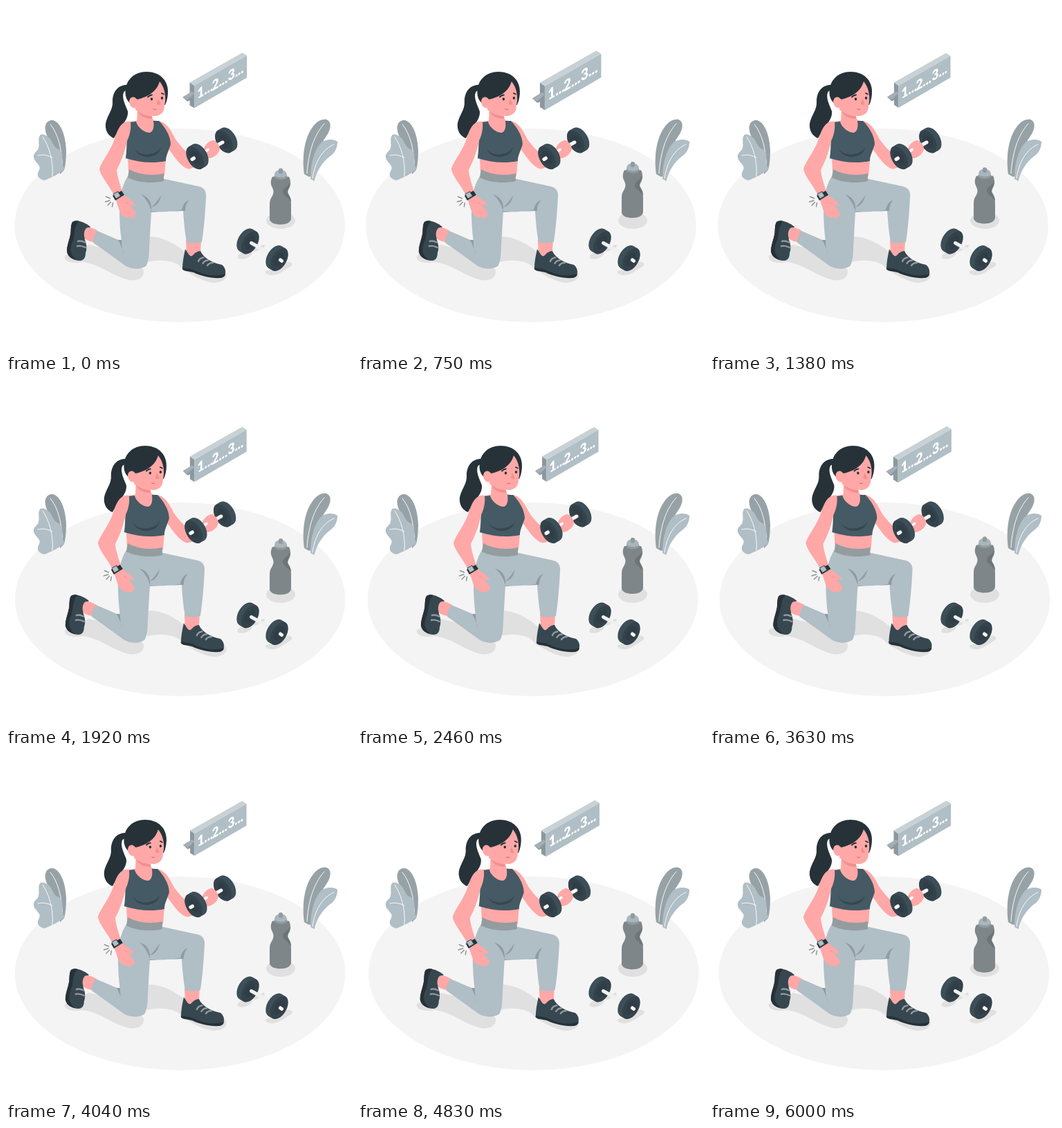
Animation of 500x500 px, one loop 6040 ms. Source, as an HTML page with a canvas:

```html
<!DOCTYPE html>
<html lang="en">
<head>
<meta charset="utf-8">
<title>Counting reps</title>
<style>
html, body { margin: 0; width: 100%; height: 100%; overflow: hidden; background: #fff; }
canvas { display: block; width: 500px; height: 500px; }
</style>
</head>
<body>
<canvas id="stage"></canvas>
<script>
const canvas = document.getElementById('stage');
const ctx = canvas.getContext('2d');
const ratio = Math.max(1, window.devicePixelRatio || 1);
canvas.width = canvas.height = 500 * ratio;

const SKIN = '#ffa8a7', BLUSH = '#f28f8f', HAIR = '#263238', SLATE = '#37474f';
const TOP = '#455a64', CLOTH = '#b0bec5', FOLD = '#8f9ba1', SHADE = '#e0e0e0', WHITE = '#fafafa';

const LOOP = 6040, FRAMES = 145, STEP = 1000 / 24, LEAD = 20;

function fill(d, color) {
  ctx.fillStyle = color;
  ctx.fill(new Path2D(d));
}

function line(d, color, width) {
  ctx.strokeStyle = color;
  ctx.lineWidth = width;
  ctx.lineCap = ctx.lineJoin = 'round';
  ctx.stroke(new Path2D(d));
}

function oval(x, y, rx, ry, color, turn = 0) {
  ctx.fillStyle = color;
  ctx.beginPath();
  ctx.ellipse(x, y, rx, ry, turn, 0, Math.PI * 2);
  ctx.fill();
}

function group(dx, dy, draw) {
  ctx.save();
  ctx.translate(dx, dy);
  draw();
  ctx.restore();
}

// Piecewise linear track through [position, value] stops
function track(p, stops) {
  for (let i = 1; i < stops.length; i++) {
    const [a, va] = stops[i - 1], [b, vb] = stops[i];
    if (p <= b) return va + (vb - va) * (p - a) / (b - a);
  }
  return stops[stops.length - 1][1];
}

const SHAKE = [0, -1, 2, -4, 4, -4, 4, -4, 2, -1, 0].map((v, i) => [i / 10, v]);
const BEAT = [[0, 1], [.1, 1.1], [.3, 1], [.4, 1], [.5, 1.1], [.6, 1], [1, 1]];
const FLOAT = [[0, 0], [.5, -10], [1, 0]];
const phase = (t, period) => (t % period) / period;

// Disc of a weight; side is -1 when its face looks left, 1 when right
function weight(x, y, side) {
  const turn = side * Math.PI / 6;
  const bx = x - side * 3.2, by = y - 1.85, fx = x + side * 3.2, fy = y + 1.85;
  for (let i = 0; i <= 8; i++) {
    oval(bx + (fx - bx) * i / 8, by + (fy - by) * i / 8, 10.6, 18.3, '#3d4f58', turn);
  }
  oval(fx, fy, 10.3, 18, '#34434b', turn);
  oval(fx, fy, 6.2, 10.6, '#2f3e46', turn);
}

function plants() {
  fill('M57 180C55 170 61 164 68 165C78 168 86 184 87 208C87 220 86 230 84 237L78 243C78 226 74 208 66 197C60 190 58 186 57 180Z', '#97a2a7');
  line('M64 171C75 184 81 206 81.500 234', WHITE, 1);
  fill('M50 186C54 184 60 188 64 192C67 196 68 203 74 206C82 210 82 216 81 222C80 228 84 232 84 236C78 242 64 249 55 252C48 250 45 246 46 242C47 238 50 235 48 231C45 226 39 222 40 216C41 211 46 210 47 205C49 199 45 190 50 186Z', CLOTH);
  line('M53 189C62 202 69 224 67 247M46 216C54 214 61 216 67 219', WHITE, 1);
  fill('M431 243C428 222 430 195 441 178C448 167 456 163 463 164C471 167 470 178 463 188C452 203 447 222 446 243L438 247Z', '#97a2a7');
  line('M460 170C446 185 437 210 435 242', WHITE, 1);
  fill('M440 250C440 228 446 206 456 197C463 192 474 192 479 196C479 206 474 214 467 218C457 226 449 238 445.500 253Z', CLOTH);
  line('M474 200C457 207 446 226 443 249', WHITE, 1);
}

function shadows() {
  fill('M85 361C83 369 95 373 110 370C135 372 152 390 178 396C192 398 200 392 199 382L180 360L120 345Z', SHADE);
  fill('M170 340L210 333C235 336 250 348 262 358C270 365 300 375 316 383C322 390 318 399 300 400C285 398 270 390 255 380C248 368 225 365 205 370Z', SHADE);
  oval(397, 310, 21, 12, SHADE);
  oval(345, 360, 11, 5, SHADE, -.3);
  fill('M374 384C378 391 388 390 396 386L412 376C416 372 412 369 406 370Z', SHADE);
  line('M360 353L372 347', SHADE, 4);
}

function floorWeights() {
  weight(349.5, 340, 1);
  line('M354.500 342.500L384 359', '#f0f0f0', 5);
  weight(391.5, 364.5, 1);
  line('M396.500 367L398.500 368.300', WHITE, 5);
}

function bottle() {
  fill('M385 247C382 252 382 258 385 263C388 269 386 273 383 278C381 281 381 285 381 290V309C383 314 389 316 397 316C405 316 411 313 412 308V287C412 281 411 277 408 273C406 269 408 266 410 262C412 257 411 251 409 247Z', '#7f868a');
  fill('M411 255C411 260 407 264 407 269C408 273 412 276 412 283C408 277 401 275 400 269C400 263 406 262 411 255Z', '#6d757a');
  oval(397, 246.5, 9.5, 5, FOLD);
  fill('M388 245C388 239 392 237 397 237C402 237 406 240 406 245C404 249 390 249 388 245Z', '#a9b6bc');
  fill('M394 237C394 234 400 234 400 237V241C399 243 395 243 394 241Z', FOLD);
}

function sign(scale) {
  ctx.save();
  ctx.translate(302, 107.5);
  ctx.scale(scale, scale);
  ctx.translate(-302, -107.5);
  fill('M266 110.500L272.500 115V147L266 143Z', '#8d989e');
  fill('M266 110.500L341 68L347.500 72L272.500 115Z', '#c8d1d5');
  fill('M272.500 115L347.500 72V103.500L272.500 147Z', CLOTH);
  fill('M256 131.500L270 123V134.500L262.500 137.500Z', '#8d989e');
  fill('M256 131.500L269 123.500L272.500 126L262.500 135.500Z', '#a3afb5');
  ctx.fillStyle = '#fff';
  ctx.font = '900 20px Lato, "Open Sans", sans-serif';
  for (const [text, x, y] of [['1...', 276.5, 134.5], ['2...', 297.5, 123], ['3...', 320.5, 109]]) {
    ctx.save();
    ctx.transform(.866, -.5, 0, 1, x, y);
    ctx.fillText(text, 0, 0);
    ctx.restore();
  }
  ctx.restore();
}

function farArm() {
  fill('M219 166C234 167 240 184 246 194C252 202 258 209 264 213L288 205L296 216C290 223 276 234 264 235.500C252 233 242 215 233 204Z', SKIN);
  weight(318.3, 194, -1);
  line('M286 212L313 197', WHITE, 5);
  fill('M286 208C286 201 294 194 300 194C305 196 309 201 309 207C307 215 298 221 291 220C286 217 288 212 286 208Z', SKIN);
  line('M290 209L292 207.500', WHITE, 4);
  weight(276.5, 217.5, -1);
  line('M269 221.500L271.500 220', WHITE, 5);
}

function head() {
  fill('M176 114C164 113 154 122 154 138C155 150 146 158 144 170C143 180 148 188 156 191L166 174C172 168 177 160 176 152C173 144 167 133 170 125C172 121 176 122 178 122Z', HAIR);
  fill('M190 146L189 168C196 178 208 178 214 168L210 157Z', SKIN);
  fill('M172.500 125C172.500 106 186 95 203 95C222 95 234 107 234 124C234 132 232 139 230 143L190 145C180 144 172.500 136 172.500 125Z', HAIR);
  fill('M222 109C218 124 204 132 189 135L187 150C193 155 206 159 216 159C225 158 229 152 229 144C232 133 230 118 222 109Z', SKIN);
  fill('M190 152C197 157 204 159 211 159V163C202 163 194 160 190 152Z', BLUSH);
  oval(184.5, 139.5, 6.3, 8, SKIN, -.3);
  oval(210.5, 134.5, 1.7, 1.9, HAIR);
  oval(225.5, 133, 1.7, 1.9, HAIR);
  line('M205 131.500C207 129.500 209 128.500 211 128.500M225 126L228 127.500', HAIR, 1.8);
  fill('M220 134L224 142C222 144 219 143 218 141Z', BLUSH);
  line('M213 149C214.500 150 216 149.500 217 149', '#d96f72', 1.2);
}

function legs() {
  // Front foot
  fill('M260 338H282L281 357L271 363L261 357Z', SKIN);
  fill('M259 351.500C262 354 263 360 268 361.500C272 360 272 355 281 354C286 365 298 371 312 374C318 378 319 388 314 391C300 394 285 390 272 384C264 382 257 384 255 380C255 370 257 361 259 351.500Z', SLATE);
  fill('M255 378C262 380 268 379 275 383C290 390 305 391 317 387C317 390 315 392 311 393C296 394 282 390 271 385C264 383 258 384 255 380Z', HAIR);
  line('M278 369C279 366 282 364 285.500 363.500M284.500 372C286 369 289 367.500 292 367.500M291 375C293 372 296 371 299 371', '#90999e', 2.4);
  // Back foot
  fill('M98 311C106 309 116 314 122 319C117 324 113 331 114 338C117 345 117 352 115 357C115 364 112 368 107 368C97 368 90 362 88 355C88 345 92 338 93.500 328C94 319 94 312 98 311Z', SLATE);
  fill('M98 311C101 310 104 310 106 311C98 317 100 331 96 341C92 350 92 359 102 367C94 366 89 361 88 355C88 345 92 338 93.500 328C94 319 94 312 98 311Z', HAIR);
  fill('M133 325C126 321 120 318.500 116 321C112 325 112 334 115 337C119 340 124 340 128 342Z', SKIN);
  line('M104 340C107 339 111 340 114 341.500M103 347C107 346 111 347 115 349', '#90999e', 2.4);
  // Leggings
  fill('M225 249L280 261C287 263 290 269 289 277C288 297 286 322 283 341C276 343 268 343 261 341C258 325 257 310 256 296L209 298L200 262Z', CLOTH);
  fill('M176 246C169 257 164 274 164 292C164 310 165 326 167 340L132 325C128 329 126 336 126 342C141 352 158 365 172 375C181 381 194 381 202 376C206 371 207 358 207 348L210 298L229 252Z', CLOTH);
  fill('M195 272C206 276 211 283 210 296C207 286 203 279 195 272ZM224 274C222 284 217 289 210 291C216 286 219 281 224 274Z', FOLD);
  fill('M254 296C255 287 260 282 265 280C260 286 259 290 259 296Z', FOLD);
  fill('M167 338C167 347 168 353 171 359C168 351 166 345 162 338Z', FOLD);
  fill('M210 297C225 298 240 297 254 295L256 296L209 298Z', FOLD);
}

function torso() {
  fill('M176 217C190 225 212 226 231 222L229 246C212 249 190 247 177 239Z', SKIN);
  fill('M178 236C192 244 212 246 228 242V253C210 257 190 255 176 248Z', '#939c9f');
  fill('M174 170C180 165 187 168 191 164C198 172 208 172 213 165L224 167L215 192L180 190Z', SKIN);
  fill('M178 168L188 167C190 175 199 183 208 183C214 181 214 172 213 166L221 166C230 175 238 188 238 200C235 210 231 216 231 224C212 228 192 226 173 220C176 200 173 185 178 168Z', TOP);
  fill('M184 203C188 213 200 217 212 213C219 211 222 208 224 204C223 213 213 219 203 218C193 217 187 211 184 203Z', SLATE);
}

function nearArm() {
  fill('M180 167C168 165 162 176 157 192C151 210 137 226 135 236C137 246 148 258 156 273L168 268C164 256 161 246 160 237C168 222 173 205 175 195C180 185 181 175 180 167Z', SKIN);
  fill('M158 279L170 273C176 278 186 283 187 288C186 290 181 288 178 287C184 294 190 299 187 304C182 308 172 307 167 301C163 296 162 288 158 279Z', SKIN);
  line('M177 286L173 284', BLUSH, 1);
  fill('M154 274L167 267L171 273L158 281Z', HAIR);
  fill('M154.500 271.500L162 267.500L166.500 274.500L159 279Z', SLATE);
  fill('M155.500 272L161.500 268.800L165 274.500L159 278Z', CLOTH);
  line('M144.500 275.500L150.500 278M143.500 283L150 281M147 288L151.500 283.500M153.500 290L154.500 284.500', '#8e9294', 1.4);
}

function athlete() {
  farArm();
  head();
  legs();
  torso();
  nearArm();
}

function render(ms) {
  const frame = Math.floor((ms % LOOP + 5) / (LOOP / FRAMES)) % FRAMES;
  const t = frame * STEP + LEAD;
  ctx.setTransform(ratio, 0, 0, ratio, 0, 0);
  ctx.fillStyle = '#fff';
  ctx.fillRect(0, 0, 500, 500);
  group(track(phase(t, 3000), SHAKE), 0, () => oval(251.3, 317, 238.7, 140, '#f4f4f4'));
  plants();
  shadows();
  floorWeights();
  group(0, track(phase(t, 1500), FLOAT), bottle);
  sign(track(phase(t, 1500), BEAT));
  group(track(phase(t, 6000), SHAKE), 0, athlete);
}

const start = performance.now();
function tick() {
  render(performance.now() - start);
  requestAnimationFrame(tick);
}
tick();
</script>
</body>
</html>
```
